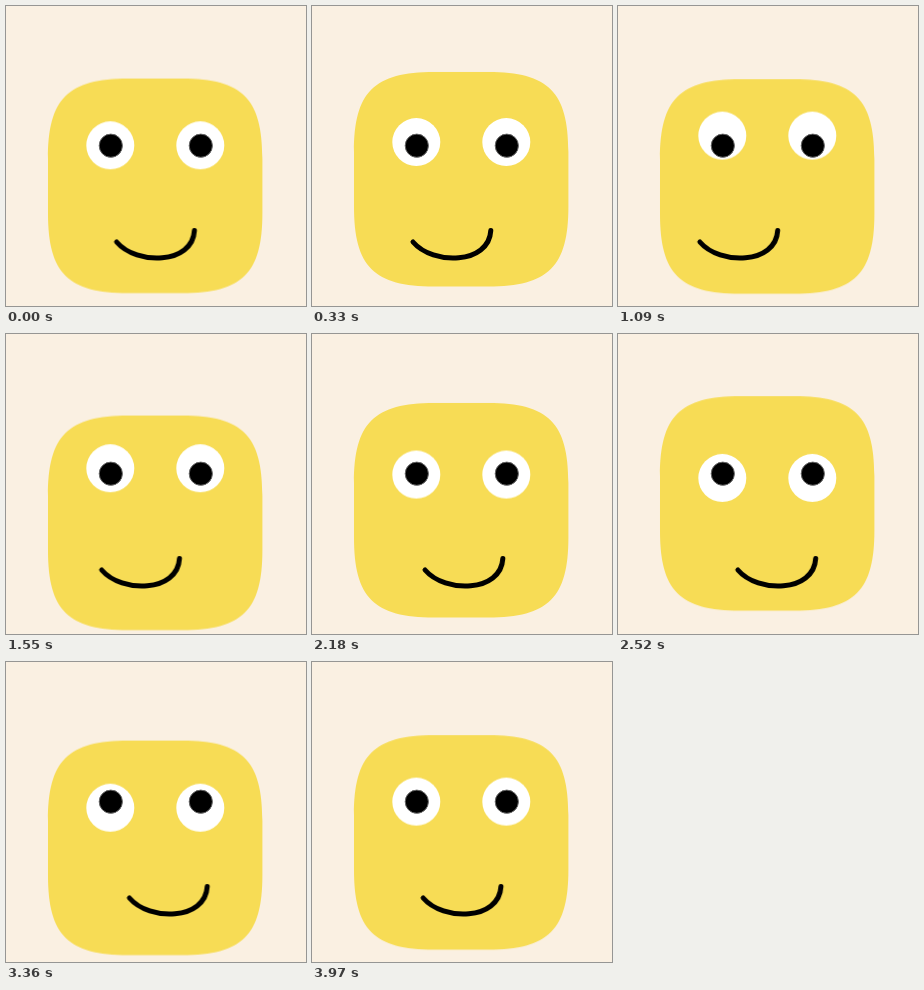
An HTML page that plays this animation: 300 by 300 pixels, repeating every 4 s.

```html
<!DOCTYPE html>
<html lang="en">
<head>
<meta charset="utf-8">
<title>Smiling face</title>
<style>
  html, body { margin: 0; width: 100%; height: 100%; overflow: hidden; background: #faf0e2; }
  svg { display: block; width: 300px; height: 300px; }
</style>
</head>
<body>
<svg viewBox="0 0 300 300">
  <path id="head" fill="#f7dc55"
    d="M42 152c0-60 20-80 80-80h54.4c60 0 80 20 80 80v54.4c0 60-20 80-80 80h-54.4c-60 0-80-20-80-80z"/>
  <g id="eyes" fill="#fff">
    <circle cx="104.3" cy="139.1" r="24"/>
    <circle cx="194.3" cy="139.1" r="24"/>
  </g>
  <g fill="#000" stroke="#666">
    <circle cx="104.8" cy="139.7" r="11.6"/>
    <circle cx="194.8" cy="139.7" r="11.6"/>
  </g>
  <path id="mouth" fill="none" stroke="#000" stroke-width="5" stroke-linecap="round"
    d="M110 236C130 259.5 186 258.5 187.8 224.5"/>
</svg>
<script>
  const LAG = 30;
  const start = document.timeline.currentTime || 0;

  // Each part drifts linearly through evenly spaced offsets.
  function drift(id, axis, offsets, duration) {
    const steps = offsets.map(d => ({ transform: `translate${axis}(${d}px)` }));
    const timing = { duration, iterations: Infinity, iterationStart: 1 - LAG / duration };
    document.getElementById(id).animate(steps, timing).startTime = start;
  }

  drift('head', 'Y', [0, -10, 0, 10, 0], 2000);
  drift('eyes', 'Y', [0, -10, 0, 10, 0], 4000);
  drift('mouth', 'X', [0, -30, 0, 20, 0], 4000);
</script>
</body>
</html>
```
